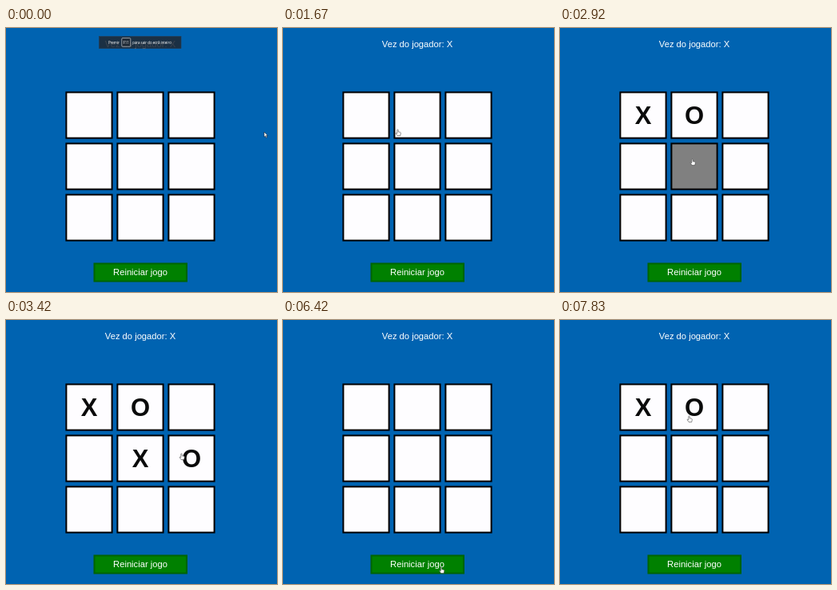
An HTML page for the animation above (8 s loop, 339x330 px).

```html
<!DOCTYPE html>
<html lang="pt">
<head>
<meta charset="utf-8">
<title>Jogo do galo</title>
<style>
html, body { margin: 0; width: 100%; height: 100%; overflow: hidden; background: #0063b1; }
svg { display: block; width: 339px; height: 330px; font-family: "Liberation Sans", Arial, sans-serif; }
text { text-anchor: middle; }
.label { font-size: 11.2px; fill: #fff; }
.cell { fill: #fefdff; stroke: #000; stroke-width: 2; }
.cell.active { fill: #808080; }
.mark { font-size: 31px; font-weight: bold; fill: #0a0a0a; }
.button { fill: #008000; stroke: #006400; stroke-width: 2; }
.hint text { font: 4.4px "Open Sans", sans-serif; fill: #fff; text-anchor: start; }
</style>
</head>
<body>
<svg viewBox="0 0 339 330">
  <text id="turn" class="label" x="168" y="23.5"></text>
  <text id="win" class="label" x="168" y="58.5">Jogador: X venceu!</text>
  <g id="board"></g>
  <g id="restart">
    <rect class="button" x="110.5" y="294.5" width="115.5" height="22"/>
    <text class="label" x="168" y="309">Reiniciar jogo</text>
  </g>
  <g id="hint" class="hint">
    <rect x="116.5" y="10.5" width="102.5" height="15" fill="#1f2a36" fill-opacity=".88" stroke="#2b3a4a" stroke-width=".6"/>
    <rect x="144.8" y="12.6" width="11" height="10.6" rx="1" fill="#1f2a36" stroke="#e8e8e8" stroke-width=".6"/>
    <text x="128" y="19.6">Premir</text>
    <text x="146.6" y="19.6">F11</text>
    <text x="158.2" y="19.6">para sair do ecrã inteiro</text>
  </g>
  <g id="cursor" stroke-linejoin="round">
    <path id="arrow" d="M0 0V6.2L1.5 4.9 2.5 7.2 3.5 6.7 2.5 4.5H4.4Z" fill="#fff" stroke="#111" stroke-width=".5"/>
    <path id="hand" d="M-.7 .4Q0-.5 .7 .4V2.8L3.2 3.3Q3.9 3.6 3.8 4.5L3.2 7.6H-.4L-2.3 4.8Q-2.3 3.8-1.4 4.2L-.7 4.8Z" fill="#fff" stroke="#444" stroke-width=".6"/>
  </g>
</svg>
<script>
const LOOP = 8000, STEP = 1000 / 12;
const NS = "http://www.w3.org/2000/svg";
const $ = id => document.getElementById(id);

// Times below are in steps of 1/12 s.
const WIN = 52, RESET = 76;
const moves = [
  // placed, cell, mark, pressed
  [24, 0, "X", 23], [29, 1, "O", 28], [37, 4, "X", 35], [40, 5, "O", 39],
  [52, 8, "X", 50], [87, 0, "X", 86], [91, 1, "O", 90]
];
const path = [
  // step, x, y
  [17, 323, 130], [18, 292, 132], [19, 218, 134], [20, 143.5, 127], [21, 118, 121],
  [22, 110, 118], [24, 110, 118], [27, 160, 121], [29, 160, 121], [33, 165.5, 164],
  [37, 165.5, 164], [38, 219.5, 167], [41, 219.5, 167], [44, 235, 232],
  [71, 235, 232], [75, 198, 309], [79, 198, 309], [85, 112, 119], [87, 112, 119],
  [90, 161.5, 120], [95, 161.5, 120]
];

function add(tag, cls, attrs) {
  const el = document.createElementNS(NS, tag);
  el.setAttribute("class", cls);
  for (const key in attrs) el.setAttribute(key, attrs[key]);
  return $("board").appendChild(el);
}

const cells = Array.from({ length: 9 }, (_, i) => {
  const x = 104 + i % 3 * 64, y = 109 + Math.floor(i / 3) * 64;
  return {
    x, y,
    box: add("rect", "cell", { x: x - 28.6, y: y - 28.6, width: 57.2, height: 57.2 }),
    mark: add("text", "mark", { x, y: y + 11 })
  };
});

function pointer(k) {
  const i = path.findIndex(p => p[0] >= k);
  if (i <= 0) return path[0].slice(1);
  const [k0, x0, y0] = path[i - 1], [k1, x1, y1] = path[i];
  const u = (k - k0) / (k1 - k0), e = u * u * (3 - 2 * u);
  return [x0 + (x1 - x0) * e, y0 + (y1 - y0) * e];
}

const shift = (id, x, y) => $(id).setAttribute("transform", `translate(${x} ${y})`);
const show = (id, on) => $(id).setAttribute("visibility", on ? "visible" : "hidden");

function draw(k) {
  const won = k >= WIN && k < RESET;
  const placed = moves.filter(m => m[0] <= k && (k < RESET || m[0] >= RESET));
  const pressed = moves.find(m => k >= m[3] && k < m[0]);

  cells.forEach((cell, i) => {
    const move = placed.find(m => m[1] === i);
    cell.mark.textContent = move ? move[2] : "";
    cell.box.classList.toggle("active", !!pressed && pressed[1] === i);
  });

  $("turn").textContent = "Vez do jogador: " + (placed.length % 2 ? "O" : "X");
  show("win", won);
  shift("turn", 0, won ? -1.5 : 0);
  shift("board", 0, won ? 5 : 0);
  shift("restart", 0, won ? 1.7 : 0);
  $("hint").setAttribute("opacity", Math.max(0, Math.min(1, (17 - k) / 10)));

  const [x, y] = pointer(k);
  const top = won ? 5 : 0;
  const onCell = cells.some(c => Math.abs(x - c.x) < 29.6 && Math.abs(y - c.y - top) < 29.6);
  const onButton = x > 110 && x < 226 && y > 294 && y < 318;
  show("hand", onCell || onButton);
  show("arrow", !onCell && !onButton);
  shift("cursor", x, y);
}

const start = performance.now();
function tick() {
  const t = (performance.now() - start) % LOOP;
  draw(Math.min(95, Math.floor((t + 4) / STEP)));
  requestAnimationFrame(tick);
}
tick();
</script>
</body>
</html>
```
